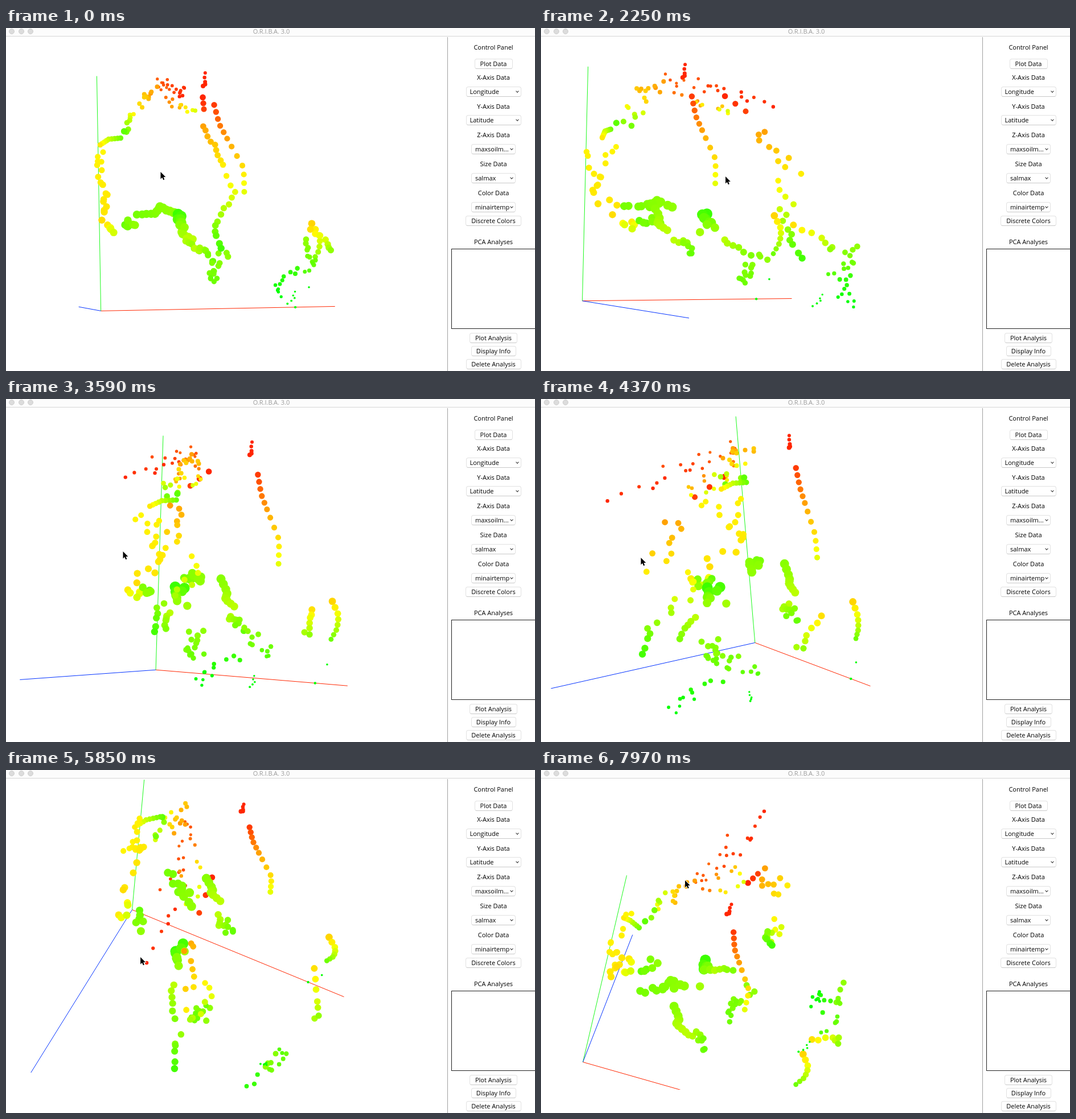
An HTML page with a canvas that plays this animation: 929 by 603 pixels, repeating every 8 s.

```html
<!DOCTYPE html>
<html lang="en">
<head>
<meta charset="utf-8">
<title>Scatter plot</title>
<style>
html, body { margin: 0; width: 100%; height: 100%; overflow: hidden; background: #fff; }
body { position: relative; font: 11px/16px "Open Sans", "Noto Sans", sans-serif; color: #000; }
canvas { position: absolute; left: 0; top: 0; }
.bar { position: absolute; left: 0; top: 0; width: 929px; height: 14px; background: #fcfcfc; border-bottom: 1px solid #d6d6d6; }
.bar i { position: absolute; top: 1px; width: 8px; height: 8px; border: 1px solid #cfcfcf; border-radius: 50%; background: #dcdcdc; }
.bar b { position: absolute; left: 366px; width: 200px; top: -2px; text-align: center; font-weight: 400; color: #9a9a9a; }
.side { position: absolute; left: 775px; top: 16px; width: 1px; height: 587px; background: #a0a0a0; }
.label, .button, .menu { position: absolute; white-space: nowrap; box-sizing: border-box; }
.label { left: 776px; width: 160px; text-align: center; }
.button, .menu { height: 18px; border: 1px solid #e2e2e2; border-bottom-color: #c9c9c9; border-radius: 4px; background: #fff; }
.button { text-align: center; }
.menu { padding-left: 6px; }
.menu::after { content: ""; position: absolute; right: 4px; top: 5px; width: 3px; height: 3px; border: solid #333; border-width: 0 1.2px 1.2px 0; transform: rotate(45deg); }
.list { position: absolute; left: 782px; top: 388px; width: 160px; height: 139px; border: 1px solid #222; }
</style>
</head>
<body>
<div class="bar"><i style="left:5px"></i><i style="left:22px"></i><i style="left:38px"></i><b>O.R.I.B.A. 3.0</b></div>
<div class="side"></div>
<div class="list"></div>
<canvas id="view" width="775" height="603"></canvas>
<script>
function addControl(kind, text, y, width) {
  const el = document.createElement('div');
  el.className = kind;
  el.textContent = text;
  el.style.top = Math.round(y) + 'px';
  if (width) {
    el.style.width = width + 'px';
    el.style.left = 856 - width / 2 + 'px';
  }
  document.body.append(el);
}
addControl('label', 'Control Panel', 26);
addControl('button', 'Plot Data', 54, 67);
const choices = { 'X-Axis': 'Longitude', 'Y-Axis': 'Latitude', 'Z-Axis': 'maxsoilm...', Size: 'salmax', Color: 'minairtemp' };
Object.entries(choices).forEach(([name, value], i) => {
  addControl('label', name + ' Data', 79 + 50.7 * i);
  addControl('menu', value, 102.6 + 50.8 * i, i < 2 ? 97 : 78);
});
addControl('button', 'Discrete Colors', 330, 98);
addControl('label', 'PCA Analyses', 368);
addControl('button', 'Plot Analysis', 536, 84);
addControl('button', 'Display Info', 559, 79);
addControl('button', 'Delete Analysis', 582, 97);

const ctx = document.getElementById('view').getContext('2d');
const CX = 261.3, CY = 281.5, SCALE = 413, LOOP = 8000;
const { sin, cos, PI } = Math;
const dots = [];
const mix = (a, b, k) => a + (b - a) * k;
const mixAll = (a, b, k) => a.map((v, i) => mix(v, b[i], k));

let seed = 7;
function scatter(size) {
  seed = (seed * 16807) % 2147483647;
  return (seed / 2147483647 * 2 - 1) * size;
}

// Front-view position and depth in percent, to model space around the pivot.
function toModel(sx, sy, depth) {
  const x = (sx - CX) / SCALE, y = (CY - sy) / SCALE, z = depth / 100 - 0.43;
  return [x + 0.017 * y + 0.094 * z, y - 0.017 * (x + z), z];
}

// Dots along a path; radius, hue and depth run between two values, blur scatters them.
function coast({ n, r, hue, depth = [0, 0], blur = 0, deep = 0 }, ...path) {
  for (let i = 0; i < n; i++) {
    const k = i / (n - 1), u = k * (path.length - 1);
    const leg = Math.min(Math.floor(u), path.length - 2);
    const [x, y] = mixAll(path[leg], path[leg + 1], u - leg);
    const z = Math.max(0, mix(...depth, k) + scatter(deep));
    dots.push({
      at: toModel(x + scatter(blur), y + scatter(blur), z),
      r: mix(...r, k),
      color: `hsl(${mix(...hue, k)} 100% 50%)`
    });
  }
}

// north
coast({ n: 5, r: [3, 4], hue: [9, 9], blur: 5 }, [346, 81], [349, 103]);
coast({ n: 3, r: [5.3, 5], hue: [9, 15], depth: [34, 50] }, [346, 122], [348, 143]);
coast({ n: 20, r: [2.5, 3.2], hue: [24, 9], depth: [15, 75], blur: 14, deep: 18 }, [268, 92], [316, 112]);
coast({ n: 11, r: [3, 3.7], hue: [26, 68], depth: [30, 45], blur: 6, deep: 12 }, [282, 126], [328, 150]);
coast({ n: 11, r: [4, 4], hue: [36, 52], depth: [16, 8], blur: 8, deep: 8 }, [262, 108], [230, 134]);
coast({ n: 8, r: [3.8, 5.6], hue: [58, 98], depth: [12, 12], blur: 4, deep: 12 }, [222, 148], [206, 184]);

// west
coast({ n: 9, r: [4.8, 4.8], hue: [94, 55], depth: [3, 11] }, [201, 193], [180, 195], [165, 205]);
coast({ n: 17, r: [5, 6.2], hue: [58, 54], depth: [11, 11], blur: 5, deep: 11 }, [166, 216], [163, 255], [173, 290], [177, 328]);
coast({ n: 6, r: [6.2, 6.6], hue: [52, 70], depth: [22, 28], blur: 5, deep: 10 }, [172, 340], [188, 357]);

// south
coast({ n: 6, r: [6.6, 7], hue: [96, 86], depth: [24, 33], blur: 6, deep: 4 }, [207, 343], [221, 343]);
coast({ n: 13, r: [7, 8], hue: [92, 86], depth: [7, 13], blur: 1, deep: 4 }, [230, 327], [262, 326], [271, 314], [294, 325]);
coast({ n: 9, r: [8, 7], hue: [88, 76] }, [297, 325], [312, 348], [308, 360], [328, 371]);
coast({ n: 9, r: [9.6, 7.2], hue: [106, 82], depth: [36, 38], blur: 4, deep: 6 }, [306, 326], [304, 340], [312, 359]);
coast({ n: 6, r: [6.2, 6], hue: [76, 90], depth: [50, 62], blur: 3 }, [314, 371], [338, 391]);
coast({ n: 11, r: [6.2, 5.4], hue: [76, 96], depth: [4, 9], blur: 4, deep: 4 }, [330, 388], [352, 391], [362, 411]);
coast({ n: 14, r: [5.6, 4.6], hue: [86, 95], depth: [56, 43], blur: 9, deep: 6 }, [383, 397], [357, 423], [368, 444]);

// east
coast({ n: 12, r: [5.2, 5], hue: [14, 66] }, [366, 135], [375, 169], [392, 200], [418, 246], [419, 288]);
coast({ n: 9, r: [5.4, 5.4], hue: [38, 56], depth: [60, 78], blur: 3, deep: 8 }, [346, 174], [368, 208], [380, 241]);
coast({ n: 13, r: [5.2, 6.2], hue: [58, 104], depth: [56, 84], blur: 2, deep: 8 }, [387, 262], [404, 295], [384, 316], [370, 343], [367, 363], [378, 389]);

// island
coast({ n: 8, r: [6.4, 4.4], hue: [50, 94] }, [538, 344], [553, 368], [551, 391], [539, 411]);
coast({ n: 7, r: [6, 5.6], hue: [53, 86], depth: [18, 36], blur: 3, deep: 5 }, [537, 357], [560, 370], [573, 394]);
coast({ n: 11, r: [5.3, 3.4], hue: [86, 100], depth: [66, 54], blur: 5, deep: 6 }, [532, 375], [527, 398], [543, 412], [528, 430]);
coast({ n: 11, r: [4.2, 2.6], hue: [106, 122], depth: [68, 86], blur: 5, deep: 7 }, [511, 422], [490, 441], [475, 460], [481, 474]);
coast({ n: 5, r: [1.7, 2], hue: [120, 120], depth: [52, 50], blur: 4 }, [512, 463], [497, 484]);
coast({ n: 2, r: [1.8, 2.2], hue: [120, 120] }, [533, 456], [509, 491]);

// time, azimuth, elevation, roll, pointer x, pointer y
const drag = [
  [150, 5.4, -1.1, -1, 271.5, 253],
  [1200, -6.6, 4.1, -0.4, 303.5, 264],
  [2250, -27.1, 4, 1.4, 324, 261],
  [3590, 35.2, 4.2, 1.8, 205.5, 268],
  [5000, 69.2, 17.8, -6.7, 167, 282],
  [6750, 4.2, 63.8, 9.6, 261, 346],
  [7970, -4.7, -35.3, 13.2, 253, 194]
];

// Each drag burst redraws every 150 ms and settles on its last moment.
const bursts = [[300, 1200], [1350, 2250], [2400, 3440], [3590, 4520], [4700, 5680], [5850, 6750], [6900, 7830], [7970, 7970]];
const steps = [0];
for (const [from, to] of bursts) {
  for (let t = from; t <= to - 130; t += 150) steps.push(t);
  steps.push(to);
}

function poseAt(t) {
  if (t <= drag[0][0]) return drag[0];
  const i = drag.findIndex(d => d[0] >= t);
  const a = drag[i - 1], b = drag[i];
  const k = (t - a[0]) / (b[0] - a[0]);
  return mixAll(a, b, 1 - (1 - k) ** 2);
}

function projector(...angles) {
  const [a, e, p] = angles.map(d => d * PI / 180);
  const right = [cos(a), 0, -sin(a)];
  const up = [-sin(e) * sin(a), cos(e), -sin(e) * cos(a)];
  const dot = (u, v) => u[0] * v[0] + u[1] * v[1] + u[2] * v[2];
  return v => {
    const h = dot(right, v), k = dot(up, v);
    return [CX + SCALE * (h * cos(p) + k * sin(p)), CY - SCALE * (k * cos(p) - h * sin(p))];
  };
}

const origin = [-0.28, -0.51, -0.43];
const axisColors = ['#ff2600', '#1cf91c', '#0433ff'];
const arrow = new Path2D('M0 0V12.4L2.8 9.8L4.8 14.2L6.8 13.3L5 9H8.8Z');

function draw(t) {
  const [, az, el, roll, px, py] = poseAt(t);
  const project = projector(az, el, roll);
  ctx.clearRect(0, 0, 775, 603);
  ctx.save();
  ctx.beginPath();
  ctx.rect(0, 17, 775, 545);
  ctx.clip();
  ctx.lineWidth = 1;
  axisColors.forEach((color, i) => {
    const end = origin.slice();
    end[i] += 1;
    ctx.strokeStyle = color;
    ctx.beginPath();
    ctx.moveTo(...project(origin));
    ctx.lineTo(...project(end));
    ctx.stroke();
  });
  for (const d of dots) {
    ctx.fillStyle = d.color;
    ctx.beginPath();
    ctx.arc(...project(d.at), d.r, 0, 2 * PI);
    ctx.fill();
  }
  ctx.restore();
  ctx.save();
  ctx.translate(px, py);
  ctx.lineWidth = 1.6;
  ctx.strokeStyle = '#fff';
  ctx.stroke(arrow);
  ctx.fillStyle = '#000';
  ctx.fill(arrow);
  ctx.restore();
}

const start = performance.now();
let shown = -1;
function tick() {
  const t = (performance.now() - start) % LOOP;
  const step = steps.filter(s => s <= t).pop() ?? 0;
  if (step !== shown) draw(shown = step);
  requestAnimationFrame(tick);
}
tick();
</script>
</body>
</html>
```
